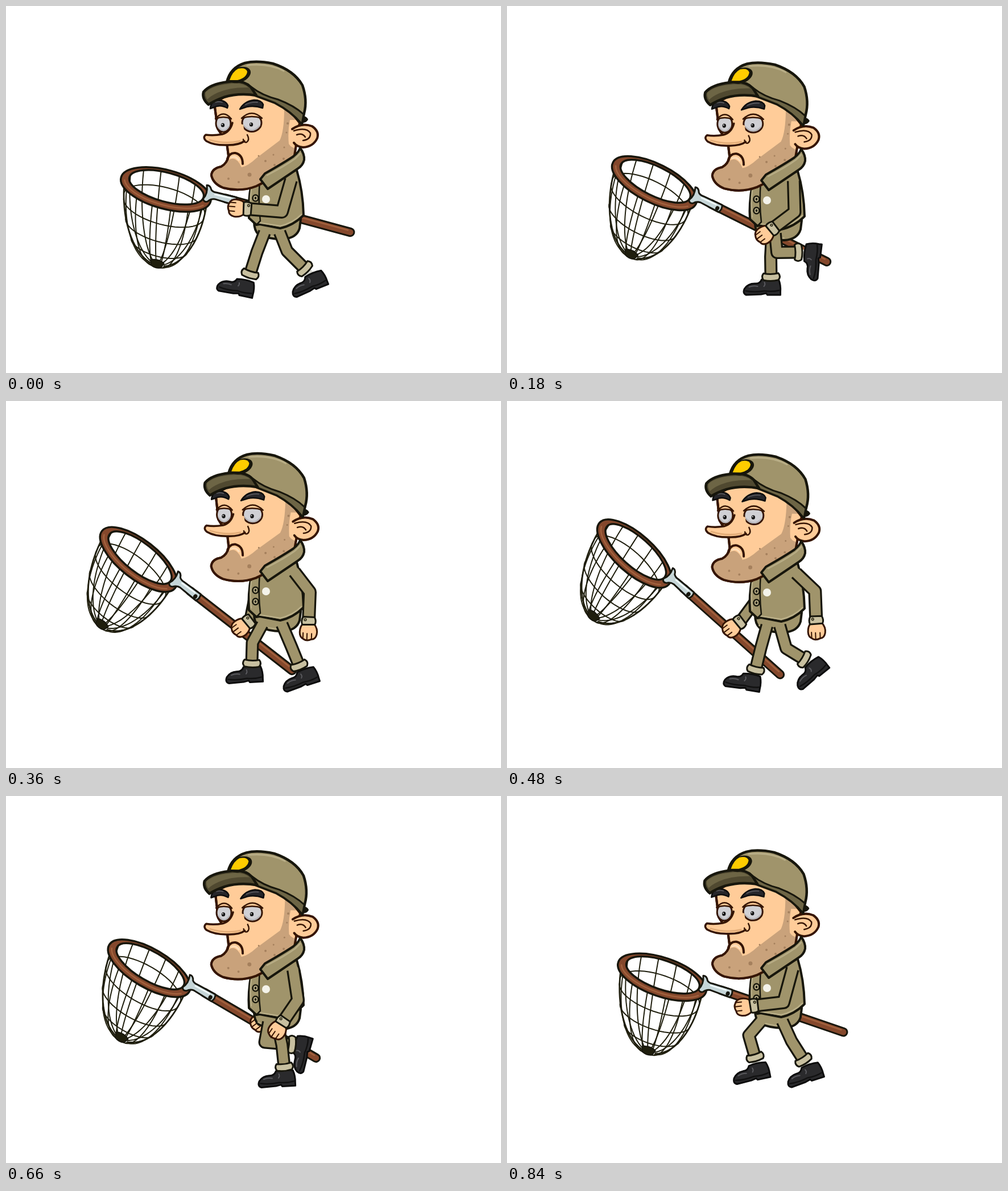
An HTML page with a canvas for the animation above (0.9 s loop, 870x644 px).

```html
<!DOCTYPE html>
<html lang="en">
<head>
<meta charset="utf-8">
<title>Walking man with a net</title>
<style>
html, body { margin: 0; width: 100%; height: 100%; overflow: hidden; background: #fff; }
canvas { display: block; }
</style>
</head>
<body>
<canvas id="stage" width="870" height="644"></canvas>
<script>
const ctx = document.getElementById('stage').getContext('2d');
const INK = '#17160c', BROWN_INK = '#351503';
const KHAKI = '#a0946b', KHAKI_LIGHT = '#b9ae87', KHAKI_DARK = '#6d6545', CUFF = '#c8c0a0';
const SKIN = '#ffcc99', STUBBLE = '#c9a27b', WOOD = '#85482c', METAL = '#c6d6d8', BOOT = '#2a2a2c';
const STEP = 60, STEPS = 15;

// vertical offset of the upper body for each step
const BOB = [0, 2.5, 4, 2, -1, -3.5, -5, -6, -3, 1, 2, 0, -3.5, -5, -2];

// step, knee x y, cuff x y, boot x y, boot angle
const FAR_LEG = [
  [0, 441, 432, 429, 470, 404, 493, 12],
  [2, 445, 440, 447, 475, 432, 493, 0],
  [4, 482, 440, 481, 475, 465, 495, 0],
  [6, 502, 432, 515, 464, 517, 489, -18],
  [7.5, 497, 433, 525, 461, 532, 488, -22],
  [9, 478, 436, 517, 438, 537, 458, -72],
  [11, 455, 432, 502, 436, 518, 453, -74],
  [14, 425, 420, 436, 458, 429, 487, -12]
];
const NEAR_LEG = [
  [0, 494, 430, 525, 461, 532, 488, -22],
  [2, 493, 434, 531, 432, 560, 446, -88],
  [4, 456, 431, 492, 432, 513, 451, -78],
  [6, 433, 424, 432, 460, 419, 481, -3],
  [7.5, 441, 432, 429, 470, 404, 493, 12],
  [9, 456, 437, 453, 473, 434, 491, 5],
  [11, 485, 437, 489, 475, 476, 497, -3],
  [14, 500, 430, 521, 463, 523, 490, -18]
];
// swing, elbow x y, cuff x y
const ARM = [
  [0, 485, 361, 424, 356],
  [1, 486, 364, 434, 370],
  [2, 498, 361, 447, 381],
  [4, 513, 358, 487, 396],
  [6, 534, 340, 532, 391],
  [7.5, 545, 335, 549, 386]
];
// swing, joint of hoop and handle
const NET = [[0, 357, 330], [1, 348, 333], [2, 341, 334], [4, 323, 330], [6, 300, 320], [7.5, 282, 308]];

function sample(rows, t) {
  let i = 0;
  while (i < rows.length - 2 && rows[i + 1][0] <= t) i++;
  const a = rows[i], b = rows[i + 1], k = (t - a[0]) / (b[0] - a[0]);
  return a.slice(1).map((v, n) => v + (b[n + 1] - v) * k);
}
const cyclic = rows => [...rows, [STEPS, ...rows[0].slice(1)]];
const farLeg = cyclic(FAR_LEG), nearLeg = cyclic(NEAR_LEG);

function shape(d, fill, line = INK, width = 3.5) {
  const p = new Path2D(d);
  if (fill) { ctx.fillStyle = fill; ctx.fill(p, 'evenodd'); }
  if (line) { ctx.strokeStyle = line; ctx.lineWidth = width; ctx.stroke(p); }
}
function oval(x, y, rx, ry, fill, line, width, turn = 0) {
  ctx.beginPath();
  ctx.ellipse(x, y, rx, ry, turn, 0, Math.PI * 2);
  if (fill) { ctx.fillStyle = fill; ctx.fill(); }
  if (line) { ctx.strokeStyle = line; ctx.lineWidth = width; ctx.stroke(); }
}
function placed(x, y, angle, paint) {
  ctx.save();
  ctx.translate(x, y);
  ctx.rotate(angle);
  paint();
  ctx.restore();
}
const rad = deg => deg * Math.PI / 180;

// the open start melts into the shape below, the end is hidden by a cuff
function limb(points, width) {
  const d = 'M' + points.map(p => p.join(' ')).join('L');
  ctx.lineCap = 'butt';
  shape(d, null, INK, width);
  ctx.lineCap = 'round';
  shape(d, null, KHAKI, width - 6.5);
}

function hand(x, y, angle) {
  placed(x, y, angle, () => {
    shape('M4 -9Q13 -17 23 -15Q32 -13 32 -6Q36 2 32 8Q29 15 20 15Q10 15 4 9Z', SKIN, BROWN_INK, 3);
    shape('M32 -6L22 -6M34 2L22 2M31 9L21 9', null, BROWN_INK, 2);
    shape('M-7 -10Q0 -14 6 -11L7 11Q0 14 -7 10Z', CUFF, INK, 3);
    oval(-2, 6, 2, 2, KHAKI, INK, 1.2);
  });
}

function leg(pose, bob) {
  const [kx, ky, cx, cy, fx, fy, turn] = pose;
  const hip = [468 + (kx - 468) * .5, 397 + bob];
  shape(`M${cx} ${cy}L${(cx + fx) / 2 + 6} ${(cy + fy) / 2 - 3}`, null, '#d8d8d2', 14);
  placed(fx, fy, rad(turn), () => {
    shape('M-1 -14Q14 -17 29 -14Q33 -4 32 8L32 13L9 13L7 10L-2 12L-28 13Q-35 10 -31 2Q-25 -7 -13 -7Q-4 -6 -1 -14Z',
      BOOT, '#0d0d0d', 3);
    shape('M-29 6Q-14 9 4 6Q18 8 30 5', null, '#111', 2.5);
    shape('M-23 -1Q-15 -4 -8 -2M4 -9Q6 -5 3 -2', null, '#5a5a5e', 2);
  });
  limb([hip, [kx, ky], [cx, cy]], 23);
  placed(cx, cy, Math.atan2(cy - ky, cx - kx) - Math.PI / 2, () =>
    shape('M-13 -6Q0 -3 13 -6Q18 0 13 6Q0 9 -13 6Q-18 0 -13 -6Z', CUFF, INK, 3));
}

// point on the bag: depth 0 at the hoop, 1 at the tip
function bagPoint(a, depth) {
  const r = Math.sqrt(1 - depth * depth);
  return [-75.5 + 19.5 * depth + 75 * r * Math.cos(a), 11 + 134 * depth + 30 * r * Math.sin(a)];
}
function bagLine(count, at, width) {
  ctx.beginPath();
  for (let i = 0; i <= count; i++) ctx.lineTo(...at(i / count));
  ctx.lineWidth = width;
  ctx.strokeStyle = '#1f1e0d';
  ctx.stroke();
}
function net(x, y, angle) {
  placed(x, y, angle, () => {
    ctx.lineCap = 'round';
    for (let i = 0; i < 14; i++) {
      const a = i * Math.PI / 7;
      bagLine(24, k => bagPoint(a, .985 * Math.sin(k * Math.PI / 2)), i % 7 ? 2 : 2.8);
    }
    for (const depth of [.25, .5, .73]) bagLine(24, k => bagPoint(k * Math.PI, depth), 2);
    bagLine(24, k => bagPoint(Math.PI * (1 + k), .2), 2);
    shape('M-69 138Q-57 132 -45 138L-48 147Q-57 151 -66 147Z', '#1f1e0d', INK, 2);

    shape('M30 0L257 0', null, INK, 16.5);
    shape('M30 0L257 0', null, WOOD, 10.5);
    shape('M50 -2.5L252 -2.5', null, '#a2623e', 2.5);

    // hoop with a thicker front side
    shape('M-157 12A81.5 34 0 1 1 6 12A81.5 34 0 1 1 -157 12ZM-143 8A67.5 25.5 0 1 1 -8 8A67.5 25.5 0 1 1 -143 8Z',
      WOOD, INK, 3.5);
    shape('M-150 15A76 29 0 0 0 -5 22', null, '#a2623e', 2.5);

    shape('M-8 -14Q-2 -16 2 -8Q6 -5 12 -6L48 -7Q52 0 48 7L12 6Q5 7 1 13Q-5 17 -8 11Q-2 0 -8 -14Z', METAL, INK, 3);
    shape('M10 -2L38 -3', null, '#f2fafa', 2.5);
    oval(43, 2, 3.5, 4, INK);
  });
}

function torso() {
  shape('M431 312Q425 345 427 372L440 384L446 383L482 390Q505 385 523 367Q522 325 511 288L455 296Z', KHAKI, INK, 4);
  shape('M431 322Q428 345 431 368M443 380L482 386Q504 381 519 366', null, KHAKI_LIGHT, 2.5);
  shape('M446 305Q443 345 447 377L440 384', null, INK, 2.5);
  for (const y of [337, 357]) {
    oval(438.5, y, 5, 5.5, KHAKI_LIGHT, INK, 2.5);
    oval(438.5, y, 1.8, 2.2, INK);
  }
  oval(457, 339, 7, 7, '#f4f3ea');
}

function collar() {
  shape('M447 304L455 294Q487 276 505 264Q515 256 517 249Q525 260 524 270Q522 280 512 286L460 321Z', KHAKI, INK, 4);
  shape('M459 297Q490 281 508 268L517 259', null, KHAKI_LIGHT, 2.5);
}

function eye(x, y, rx, ry) {
  oval(x, y, rx, ry, '#d0d0d4', BROWN_INK, 3);
  shape(`M${x - rx + 3} ${y + 5}Q${x} ${y + ry + 5} ${x + rx - 3} ${y + 5}`, null, '#b3b3b8', 2);
  shape(`M${x - rx - 1} ${y - 8}Q${x} ${y - ry - 10} ${x + rx + 1} ${y - 8}Q${x} ${y - 14} ${x - rx - 1} ${y - 8}Z`,
    SKIN, BROWN_INK, 2.5);
  oval(x - 1, y + 3, 3.2, 3.6, '#111');
  oval(x - 2, y + 2, 1, 1, '#fff');
}

function head() {
  const face = 'M366 170L372 215L388 240L391 263Q389 276 378 282Q362 285 361 297Q364 312 382 319Q412 327 440 316Q482 296 507 262L516 205L480 160L400 150Z';
  shape(face, SKIN, BROWN_INK, 4);
  ctx.save();
  ctx.clip(new Path2D(face));
  shape('M355 283L380 283L392 270Q404 262 414 283Q425 281 440 267L481 236Q489 220 489 180L530 180L530 330L350 330Z', STUBBLE, null);
  shape('M499 200Q495 220 497 242Q503 252 520 250L520 200Z', SKIN, null);
  for (const [x, y, r] of [[391, 303, 2], [409, 309, 2], [428, 296, 3.5], [444, 263, 1.5], [456, 272, 2], [470, 261, 1.5],
    [472, 279, 2], [488, 268, 2], [493, 222, 1.5], [495, 206, 2], [489, 248, 1.5]]) oval(x, y, r, r, '#a5805d');
  ctx.restore();
  shape(face, null, BROWN_INK, 4);

  // ear
  shape('M503 216Q520 204 538 211Q551 220 547 232Q540 247 522 248Q511 247 506 240', SKIN, BROWN_INK, 4);
  shape('M506 219Q528 212 535 223Q536 234 522 236M511 226Q521 222 526 230', null, BROWN_INK, 2.5);

  eye(382, 206, 13, 15);
  eye(432, 205, 17, 15.5);

  // nose and mouth
  shape('M398 205Q394 221 380 225Q365 228 351 226Q345 231 352 237Q366 245 390 244Q410 244 421 237L417 208Z', SKIN, null);
  shape('M398 205Q394 221 380 225Q365 228 351 226Q345 231 352 237Q366 245 390 244Q410 244 419 237', null, BROWN_INK, 3.5);
  shape('M358 235Q385 243 411 237', null, '#e3ad78', 3);
  shape('M424 226Q429 235 423 239Q418 240 417 234', null, BROWN_INK, 2.5);
  shape('M389 268Q393 257 403 258Q416 261 416 277', null, BROWN_INK, 4);
  shape('M396 266Q403 262 409 270', null, '#ffe0bd', 3);

  // brows
  shape('M359 180Q360 166 373 165Q387 166 390 175L389 179Q376 172 365 178Z', '#26262a', '#0d0d0d', 2.5);
  shape('M411 181Q419 167 436 165Q449 165 452 173L451 179Q436 174 423 177Z', '#26262a', '#0d0d0d', 2.5);
  shape('M368 169Q374 167 380 169M421 173Q431 168 442 169', null, '#57575c', 1.8);

  cap();
}

function cap() {
  shape('M517 194Q527 193 530 199Q527 205 518 204Z', INK, INK, 2);
  shape('M388 134Q394 108 420 100Q440 95 469 101Q506 113 521 139Q530 165 524 188L520 207Q502 185 473 170L438 157Q428 142 388 134Z',
    KHAKI, INK, 4.5);
  shape('M431 142Q450 157 478 164Q507 175 523 190L520 207Q502 185 473 170L438 157Z', KHAKI_DARK, INK, 3);
  shape('M424 104Q462 100 488 114', null, KHAKI_LIGHT, 3);
  shape('M347 151Q358 137 390 133Q417 129 430 142L440 157Q410 152 383 160Q366 166 356 173Q344 163 347 151Z', '#504930', INK, 4.5);
  shape('M351 151Q365 139 390 137Q414 133 426 143Q395 142 372 152Q359 158 354 164Q349 157 351 151Z', KHAKI_DARK, null);
  oval(410, 121, 21, 13, INK, null, 0, -.38);
  shape('M393 130Q398 115 408 110Q421 107 424 115Q423 126 407 130Z', '#ffcc00', null);
}

function render(step) {
  const swing = Math.min(step, STEPS - step), bob = BOB[step];
  const [nx, ny] = sample(NET, swing);
  const tilt = rad(15.1 + 3.8 * swing);
  const [ex, ey, wx, wy] = sample(ARM, swing);
  const gripX = nx + 138 * Math.cos(tilt), gripY = ny + 138 * Math.sin(tilt);

  ctx.clearRect(0, 0, 870, 644);
  ctx.lineJoin = 'round';
  const lifted = paint => placed(0, bob, 0, paint);

  lifted(() => {
    net(nx, ny, tilt);
    limb([[441, 325], [436, 355], [gripX + 20, gripY - 15]], 22);
    hand(gripX + 18, gripY - 13, rad(143));
    shape('M436 378Q436 394 444 401Q464 410 488 409Q511 407 516 390L518 374Z', KHAKI, INK, 4);
    shape('M443 397Q464 406 487 405', null, KHAKI_LIGHT, 2);
  });
  leg(sample(farLeg, step), bob);
  leg(sample(nearLeg, step), bob);
  lifted(() => {
    torso();
    limb([[501 + swing, 305], [ex, ey], [wx, wy]], 24);
    hand(wx, wy, Math.atan2(wy - ey, wx - ex));
    ctx.save();
    ctx.translate(470, 280);
    ctx.rotate(rad(swing * .2));
    ctx.translate(-470, -280);
    head();
    ctx.restore();
    collar();
  });
}

let shown = -1;
function tick() {
  const step = Math.floor(performance.now() / STEP) % STEPS;
  if (step !== shown) render(shown = step);
  requestAnimationFrame(tick);
}
tick();
</script>
</body>
</html>
```
